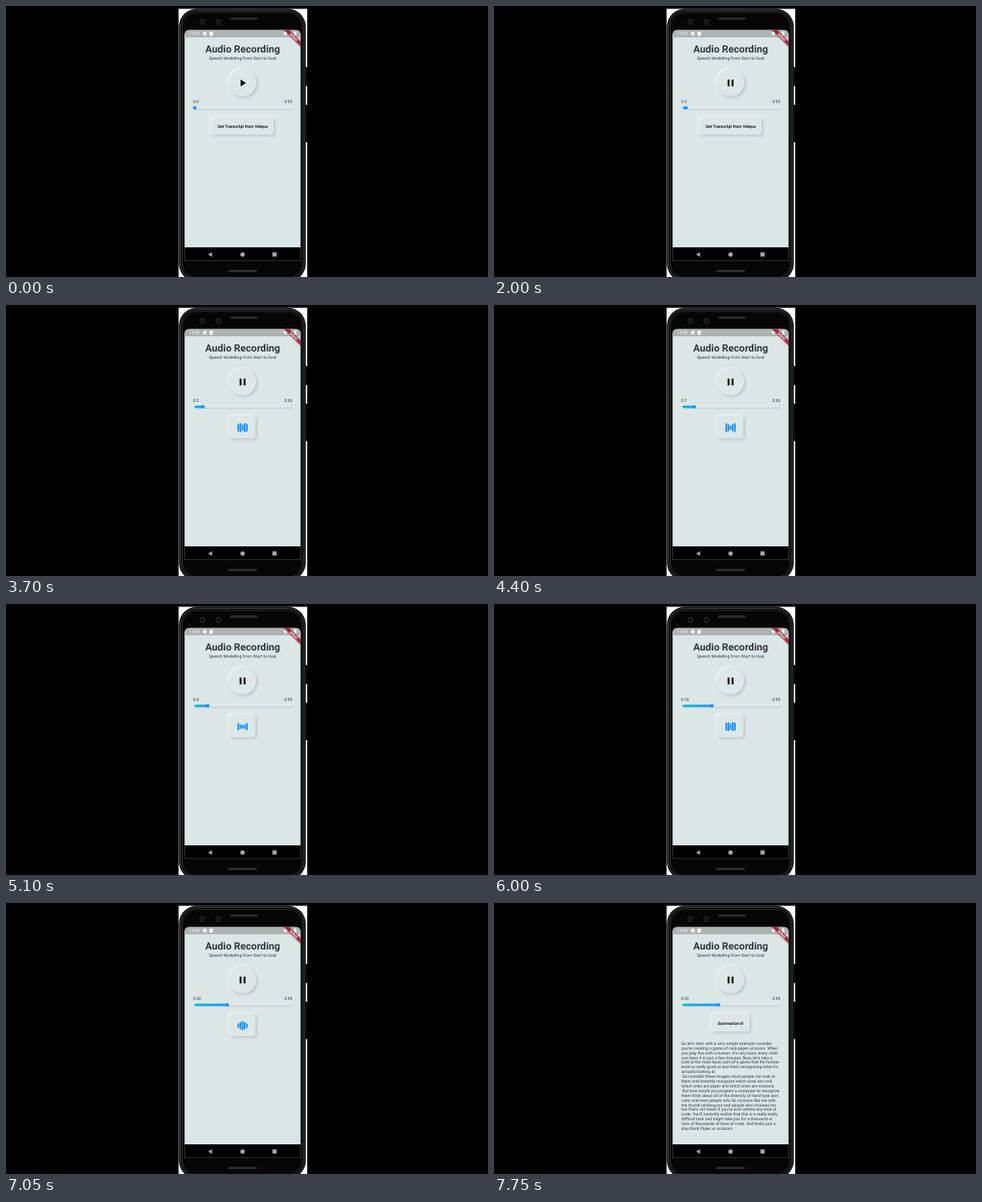
Animation, 600 px wide and 338 px high, one loop 8 s. Source, as an HTML page with a canvas:

```html
<!DOCTYPE html>
<html lang="en">
<head>
<meta charset="utf-8">
<title>Audio Recording</title>
<style>
  html, body { margin: 0; width: 100%; height: 100%; overflow: hidden; background: #000; }
  canvas { display: block; width: 600px; height: 338px; }
</style>
</head>
<body>
<canvas id="stage"></canvas>
<script>
const LOOP = 8000, BG = '#dbe6e7', INK = '#33383a', BLUE = '#2196f3', MID = 294.5;
const PLAY = 900, PRESS = 2100, LOAD = 2250, DONE = 7100, SKIP = 5850;
// Moments when the playback clock ticks; it skips eight seconds at SKIP.
const TICKS = [1550, 2000, 2480, 2950, 3450, 3900, 4400, 4850, 5350, SKIP, 6340, 6820, 7300, 7700];
const TRANSCRIPT = `So let's start with a very simple example consider
you're creating a game of rock-paper-scissors. When
you play this with a human. It's very basic every child
can learn it in just a few minutes. Now, let's take a
look at the most basic part of a game that the human
brain is really good at and that's recognizing what it's
actually looking at.
 So consider these images most people can look at
them and instantly recognize which ones are rock
which ones are paper and which ones are scissors.
 But how would you program a computer to recognize
them think about all of the diversity of hand type skin
color and even people who do scissors like me with
the thumb sticking out and people who chooses his
but that's not mean if you've ever written any kind of
code. You'll instantly realize that this is a really really
difficult task and might take you for a thousand or
tens of thousands of lines of code. And that's just a
play Rock Paper or scissors.`.split('\n');

const canvas = document.getElementById('stage');
const c = canvas.getContext('2d');
const dpr = window.devicePixelRatio || 1;
canvas.width = 600 * dpr;
canvas.height = 338 * dpr;
c.scale(dpr, dpr);
c.textRendering = 'geometricPrecision';

function box(x, y, w, h, r, fill, line, width = 1) {
  c.beginPath();
  c.roundRect(x, y, w, h, r);
  if (fill) { c.fillStyle = fill; c.fill(); }
  if (line) { c.strokeStyle = line; c.lineWidth = width; c.stroke(); }
}

function disc(x, y, r, fill) {
  c.beginPath();
  c.arc(x, y, r, 0, 7);
  c.fillStyle = fill;
  c.fill();
}

function shape(path, x, y, scale, fill) {
  c.save();
  c.translate(x, y);
  c.scale(scale, scale);
  c.fillStyle = fill;
  c.fill(new Path2D(path));
  c.restore();
}

function text(str, x, y, size = 5.16, weight = 400, align = 'center', fill = INK) {
  c.font = `${weight} ${size}px Roboto, sans-serif`;
  c.textAlign = align;
  c.fillStyle = fill;
  c.fillText(str, x, y);
}

// Soft raised surface: light from the top left, shade to the bottom right.
function raised(x, y, w, h, r, depth = 1) {
  for (const [dir, color] of [[-1, 'rgba(255,255,255,.7)'], [1, 'rgba(120,138,142,.4)']]) {
    c.save();
    c.shadowColor = color;
    c.shadowOffsetX = c.shadowOffsetY = dir * 1.5 * depth * dpr;
    c.shadowBlur = 3.8 * depth * dpr;
    box(x, y, w, h, r, '#dee7e8');
    c.restore();
  }
}

// Button depth dips for 200 ms after a press.
function depthAfter(t, start) {
  const p = (t - start) / 200;
  return p > 0 && p < 1 ? 1 - .8 * Math.sin(Math.PI * p) : 1;
}

function phone() {
  box(0, 0, 600, 338, 0, '#000');
  box(214.8, 3.6, 160.2, 335, 0, '#fff');
  box(372, 76, 3, 24, 1, '#111');
  box(372, 123, 3, 47, 1, '#111');
  box(215.3, 3.6, 157.8, 340, 22, '#060606');
  box(217.3, 5.6, 153.8, 336, 20, null, '#5c5e60', .8);
  box(219.6, 8, 149.2, 331.2, 18, null, '#38393b', .8);
  for (const x of [244.5, 264.5]) {
    disc(x, 20, 3.7, '#202122');
    disc(x, 20, 2, '#0b0c0d');
  }
  box(279, 14.2, 34, 3, 1.5, '#2c2d2e');
  box(276.5, 329, 36, 3, 1.5, '#2c2d2e');
}

function statusBar() {
  box(222, 30, 145, 9, 0, '#b0b2b2');
  text('11:00', 228, 36.2, 5.16, 400, 'left', '#fff');
  disc(247.3, 34.4, 2.3, '#fff');
  disc(247.3, 34.4, .8, '#b0b2b2');
  shape('M1 0H4V5H0V1Z', 253.5, 31.9, 1, '#fff');
  shape('M0 1.5Q3 -1 6 1.5L3 5Z', 345, 32, 1, '#fff');
  shape('M5 0V5H0Z', 351.5, 32, 1, '#fff');
  box(358.6, 31.8, 2.8, 5.2, .5, '#fff');
}

function banner() {
  c.save();
  c.translate(367, 30);
  c.rotate(Math.PI / 4);
  c.shadowColor = 'rgba(0,0,0,.5)';
  c.shadowBlur = 2.2 * dpr;
  box(-14.8, 10.3, 29.6, 4.45, 0, 'rgba(176,28,48,.82)');
  c.shadowBlur = 0;
  text('DEBUG', 0, 13.9, 3.7, 900, 'center', '#fff');
  c.restore();
}

function player(t, sec) {
  text('Audio Recording', MID, 58, 12.5, 700);
  text('Speech Modelling From Start to Goal', MID, 67.1);
  raised(277.7, 79.2, 33.6, 33.6, 16.8, depthAfter(t, PLAY));
  const icon = t < PLAY + 100 ? 'M8 5v14l11-7z' : 'M6 5h4v14H6zM14 5h4v14h-4z';
  shape(icon, MID - 12 * .62, 96 - 12 * .62, .62, '#101213');

  text('0:' + sec, 232.8, 121, 5.16, 400, 'left');
  text('0:59', 356.4, 121, 5.16, 400, 'right');
  raised(234.5, 125.7, 121, 2.6, 1.3, .4);
  const x = 235 + 2.02 * sec;
  const fill = c.createLinearGradient(234.5, 0, x + .1, 0);
  fill.addColorStop(0, '#00bcd4');
  fill.addColorStop(1, BLUE);
  box(234.5, 125.6, x - 234.5, 2.8, 1.4, fill);
  disc(x, 127, 2.3, BLUE);
}

function wave(t) {
  const phase = t < SKIP ? .5 + (t - 3700) / 600 : .51 + (t - 6000) / 600;
  for (let i = -2; i <= 2; i++) {
    const s = Math.sin(2 * Math.PI * (phase - .2 * Math.abs(i)));
    const h = 11 * (.7 + .3 * s);
    box(MID + i * 2.67 - 1.1, 153 - h / 2, 2.2, h, 0, BLUE);
  }
}

function action(t) {
  if (t < LOAD) {
    raised(256, 138.5, 77, 22, 3, depthAfter(t, PRESS));
    text('Get Transcript from Velquo', MID, 152.4, 5.16, 700, 'center', '#15191a');
  } else if (t < DONE) {
    raised(278.5, 138.5, 32, 27.5, 3);
    wave(t);
  } else {
    raised(271, 138.5, 47, 22, 3);
    text('Summarize it!', MID, 152.4, 5.16, 700, 'center', '#15191a');
    TRANSCRIPT.forEach((line, i) => text(line, 233.3, 176.8 + i * 5.9, 5.16, 400, 'left'));
  }
}

function navBar() {
  box(222, 301, 145, 17, 0, '#000');
  shape('M5 0V6L0 3Z', 251.5, 307, 1, '#a5a5a5');
  disc(MID, 310, 2.8, '#a5a5a5');
  box(331.6, 307.3, 5.3, 5.3, .4, '#a5a5a5');
}

function draw(t) {
  const ticks = TICKS.filter(at => at <= t).length;
  phone();
  c.save();
  c.beginPath();
  c.roundRect(222.3, 29.8, 144.4, 288, [6, 6, 0, 0]);
  c.clip();
  box(222, 29, 145, 289, 0, BG);
  statusBar();
  player(t, t < SKIP ? ticks : ticks + 8);
  action(t);
  banner();
  navBar();
  c.restore();
}

const start = performance.now();
function frame() {
  draw((performance.now() - start) % LOOP);
  requestAnimationFrame(frame);
}
frame();
</script>
</body>
</html>
```
